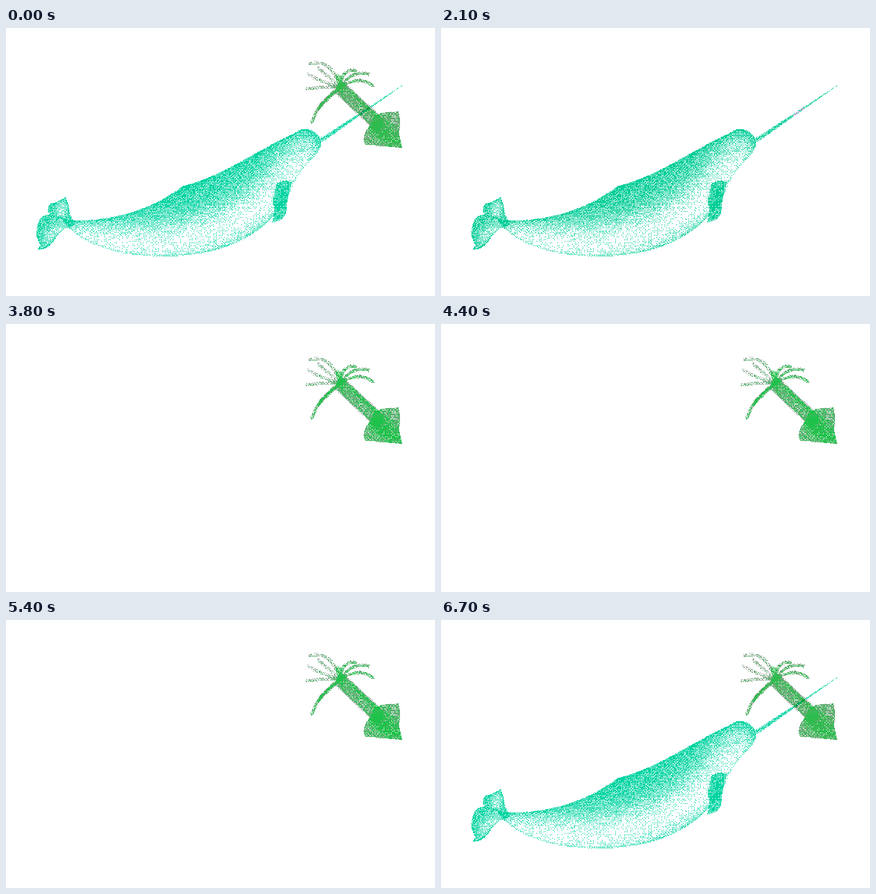
Animation of 576 by 360 pixels, one loop 8.7 s. Source, as an HTML page with a canvas:

```html
<!DOCTYPE html>
<html lang="en">
<head>
<meta charset="utf-8">
<title>Narwhal and squid</title>
<style>
  html, body { margin: 0; width: 100%; height: 100%; overflow: hidden; background: #fff; }
  canvas { display: block; }
</style>
</head>
<body>
<canvas id="stage" width="576" height="360"></canvas>
<script>
const W = 576, H = 360, LOOP = 8700;
const stage = document.getElementById('stage').getContext('2d');

const back = 'M76 258 C150 262 200 240 238 212 C290 200 340 162 386 142 C402 128 424 140 423 156';
const body = new Path2D(back +
  'C422 172 396 184 388 208 C372 240 340 305 215 307 C150 307 105 292 80 264 Z');
const flipper = new Path2D('M363 210 Q372 202 384 207 Q378 222 376 250 Q368 262 357 261 Q362 245 358 232 Z');
const fluke = new Path2D('M92 260 Q85 252 84 238 L80 227 Q70 234 59 236 Q54 244 58 250' +
  'Q40 252 41 280 L46 292 L42 298 Q58 299 68 280 Q76 268 92 265 Z');
const tusk = new Path2D('M420 150 L424 147 L537 74 L424 154 Z');
const fin = new Path2D('M495 119 Q503 113 511 113 L527 112 Q531 122 528 142 L532 161 L482 157 Q477 148 485 136 Z');
const mantle = new Path2D('M451 83 L499 128');

// Control point and tip of each arm, all starting at the head
const arms = ['436 40 408 48', '426 60 420 54', '422 72 406 62', '425 78 404 82', '420 98 411 126',
  '430 96 420 108', '450 55 469 57', '464 56 486 62', '474 62 493 78']
  .map(end => new Path2D('M449 80 Q' + end));

function layer() {
  const c = document.createElement('canvas');
  c.width = W;
  c.height = H;
  return c.getContext('2d', { willReadFrequently: true });
}

function fill(g, path, a) {
  g.fillStyle = `rgba(0,0,0,${a})`;
  g.fill(path);
}

function line(g, path, width, a, blur = 0) {
  g.filter = blur ? `blur(${blur}px)` : 'none';
  g.strokeStyle = `rgba(0,0,0,${a})`;
  g.lineWidth = width;
  g.lineCap = 'round';
  g.stroke(typeof path === 'string' ? new Path2D(path) : path);
  g.filter = 'none';
}

function erase(g, path, width, a, blur) {
  g.globalCompositeOperation = 'destination-out';
  line(g, path, width, a, blur);
  g.globalCompositeOperation = 'source-over';
}

function inside(g, path, draw) {
  g.save();
  g.clip(path);
  draw();
  g.restore();
}

// Turns the density painted by draw() into single-pixel ink dots;
// shift moves the dot grid so that two inks interleave
function stipple(out, ink, draw, shift = 0) {
  const g = layer();
  draw(g);
  const img = g.getImageData(0, 0, W, H), d = img.data;
  const cell = (x, y) => [0, 2, 3, 1][(x & 1) + 2 * (y & 1)];
  let seed = 7;
  for (let i = 0; i < W * H; i++) {
    const x = i % W + shift, y = i / W | 0;
    seed = (seed * 1664525 + 1013904223) >>> 0;
    const grid = (4 * cell(x, y) + cell(x >> 1, y >> 1) + .5) / 16;
    const on = d[i * 4 + 3] / 255 > grid * .65 + seed / 4294967296 * .35;
    d.set([...ink, on ? 255 : 0], i * 4);
  }
  g.putImageData(img, 0, 0);
  out.drawImage(g.canvas, 0, 0);
}

function whale(ink, pinkTusk) {
  const out = layer();
  stipple(out, ink, g => {
    inside(g, body, () => {
      fill(g, body, .68);
      erase(g, 'M80 282 C200 308 330 290 402 172', 46, .85, 17);
      line(g, body, 4, .25, 1);
      line(g, back, 10, .3, 4);
      line(g, 'M397 164 h2', 3, .6, 1);
    });
    inside(g, fluke, () => {
      fill(g, fluke, .66);
      erase(g, 'M78 268 Q60 272 56 286 M74 238 V252', 10, .6, 4);
      line(g, fluke, 3, .35);
    });
    line(g, 'M60 251 Q78 258 100 261', 2, .5);
    fill(g, flipper, .68);
    fill(g, tusk, .62);
    line(g, 'M424 150 L537 74', .9, .4);
  });
  if (pinkTusk) stipple(out, [255, 130, 235], g => line(g, 'M474 117 L486 108', 2.5, .5));
  return out.canvas;
}

function squid(gray, green) {
  const out = layer();
  stipple(out, gray, g => {
    arms.forEach(a => line(g, a, 5, .38));
    line(g, mantle, 20, .5);
    fill(g, fin, .5);
  });
  stipple(out, green, g => {
    arms.forEach((a, i) => line(g, a, 4, i < 4 ? .3 : .5));
    line(g, 'M447 66 L451 83', 9, .5, 1);
    line(g, mantle, 18, .52);
    line(g, 'M460 84 L498 119', 4, .4, 1);
    inside(g, fin, () => {
      fill(g, fin, .5);
      line(g, 'M490 125 L530 160', 26, .5, 4);
    });
  }, 1);
  return out.canvas;
}

const whaleSoft = whale([0, 212, 162], false);
const whaleFull = whale([0, 206, 152], true);
const squidSoft = squid([164, 160, 162], [46, 188, 78]);
const squidFull = squid([168, 168, 168], [30, 194, 74]);

function scene(t) {
  if (t < 100 || t >= 6700) return [squidSoft, whaleSoft];
  if (t < 2100) return [squidSoft];
  return [Math.floor((t - 2100) / 100) % 2 ? squidFull : whaleFull];
}

function frame() {
  stage.globalCompositeOperation = 'source-over';
  stage.fillStyle = '#fff';
  stage.fillRect(0, 0, W, H);
  stage.globalCompositeOperation = 'multiply';
  for (const pic of scene(performance.now() % LOOP)) stage.drawImage(pic, 0, 0);
  requestAnimationFrame(frame);
}
frame();
</script>
</body>
</html>
```
